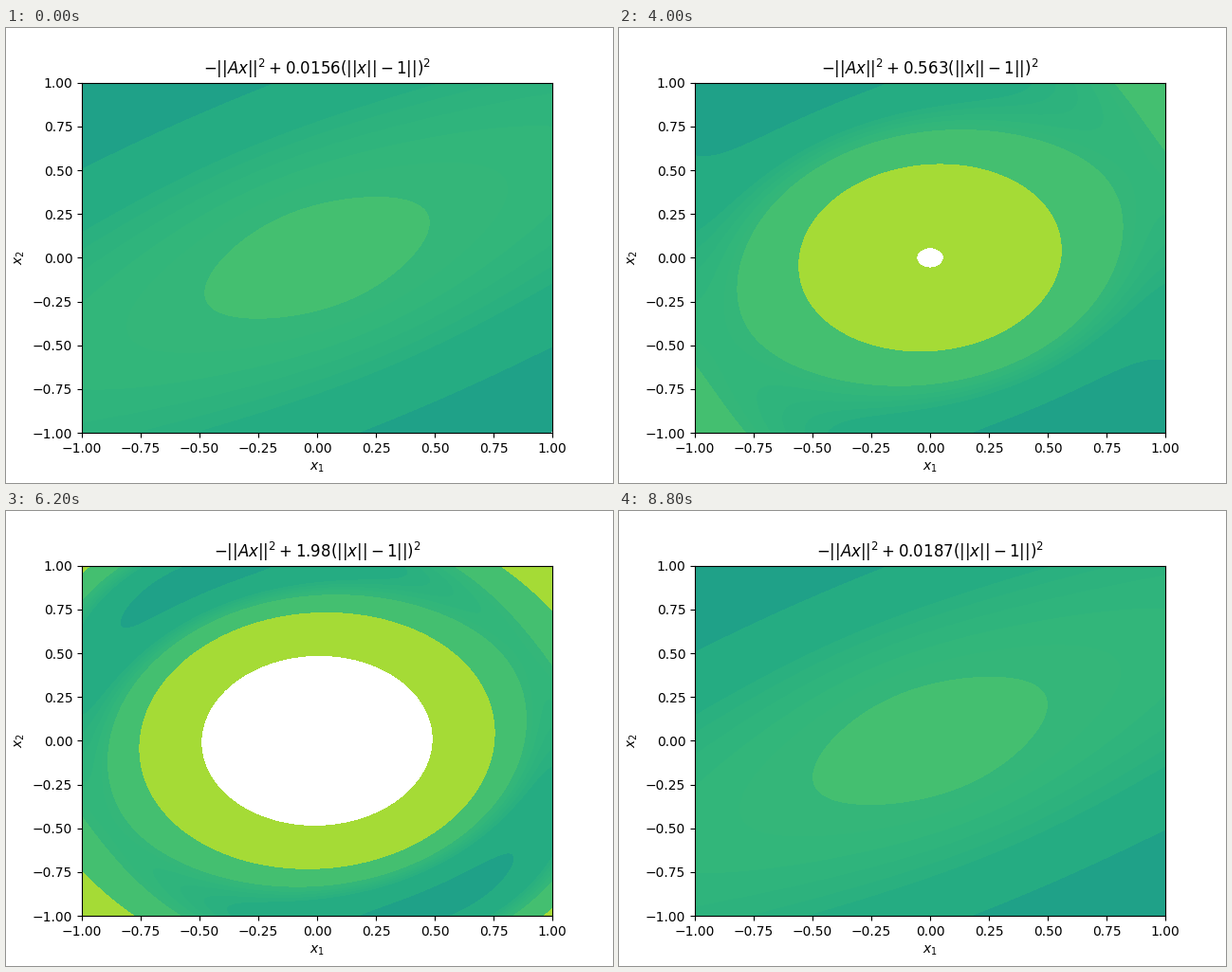
Animation of 640x480 px, one loop 9 s. Source, as a matplotlib script:

```python
import numpy as np
import matplotlib.pyplot as plt
from matplotlib.animation import FuncAnimation

LEVELS = [-0.2, -0.1, -0.05, -0.04, -0.03, -0.02, -0.01, 0, 0.1, 0.5]

# A stretches by 0.11 along the 30 degree direction and by 0.33 across it
tilt = np.radians(30)
x1, x2 = np.meshgrid(np.linspace(-1, 1, 201), np.linspace(-1, 1, 201))
along = 0.11 * (x1 * np.cos(tilt) + x2 * np.sin(tilt))
across = 0.33 * (x2 * np.cos(tilt) - x1 * np.sin(tilt))
quadratic = along**2 + across**2
ring = (np.hypot(x1, x2) - 1) ** 2

# Weights rise step by step, then fall at double speed
rising = 2 ** np.linspace(-6, 1.5, 30)
weights = np.concatenate([rising, rising[::-2]])

fig, ax = plt.subplots(figsize=(6.4, 4.8), dpi=100)
ax.set(xlim=(-1, 1), ylim=(-1, 1), xlabel="$x_1$", ylabel="$x_2$")
contours = None


def update(frame):
    global contours
    if contours is not None:
        contours.remove()
    weight = weights[frame]
    contours = ax.contourf(x1, x2, weight * ring - quadratic, levels=LEVELS,
                           cmap="viridis", vmin=-1, vmax=0.5)
    ax.set_title(rf"$-||Ax||^2 + {weight:.3g}(||x|| - 1||)^2$")
    return [contours]


anim = FuncAnimation(fig, update, frames=len(weights), interval=200,
                     repeat=True, repeat_delay=0)
plt.show()
```
